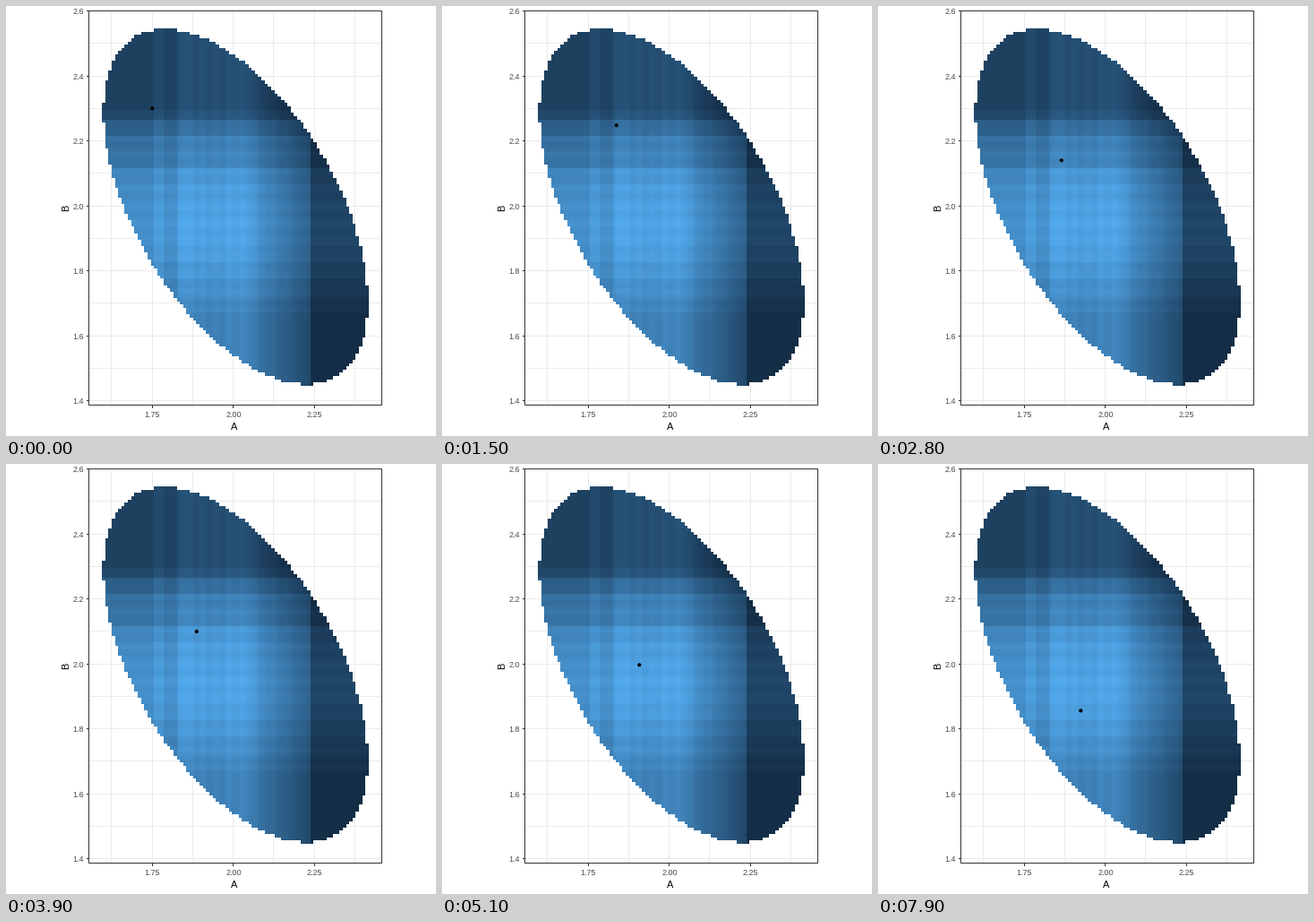
A matplotlib script that plays this animation: 480 px wide and 480 px high, repeating every 10000 ms.

```python
import numpy as np
import matplotlib.pyplot as plt
from matplotlib.animation import FuncAnimation
from matplotlib.patches import Circle, Rectangle

SIZE, DPI = 480, 100
PX = 72 / DPI                      # one pixel in points
SCALE = 362.6                      # pixels per data unit
FRAMES, INTERVAL = 100, 100
LEFT, RIGHT, TOP, BOTTOM = 92.5, 419.5, 5.5, 445.5
GRID, DARK, GREY = "#EBEBEB", "#333333", "#4D4D4D"


def to_x(a):
    return 163 + (a - 1.75) * SCALE


def to_y(b):
    return 223.2 - (b - 2) * SCALE


def profile(cells, keys):
    """Level per cell, linear between (cell, level) keys."""
    return np.interp(cells, *zip(*keys))


def heatmap():
    rng = np.random.RandomState(4)
    ca, cb = np.arange(160, 242), np.arange(254, 144, -1)   # hundredths

    f = profile(ca, [(175, .80), (176, .90), (178, .90), (179, .82), (182, .82),
                     (183, .95), (203, .95), (223, .46), (224, .23)])
    noise = np.repeat(rng.uniform(-.03, .03, ca.size // 2), 2)
    f *= 1 + noise * ((ca >= 183) & (ca < 224))

    g = profile(cb, [(165, .70), (185, .92), (195, .96), (203, .92), (211, .84),
                     (212, .74), (221, .69), (222, .57), (226, .54),
                     (227, .37), (229, .36), (230, .31)])
    noise = rng.uniform(-.02, .02, cb.size) - .04 * np.cos(2 * np.pi * (cb - 186.5) / 5.3)
    g *= 1 + noise * ((cb > 165) & (cb < 222))

    f, g = f[None, :], g[:, None]
    t = np.clip(f * g - .6 * (1 - f) * (1 - g), 0, 1)[..., None]
    low, high = np.array([19, 43, 67]) / 255, np.array([86, 177, 247]) / 255

    u = (ca[None, :] / 100 - 2.006) / .4067
    v = (cb[:, None] / 100 - 1.996) / .547
    rho = -.533
    inside = u * u - 2 * rho * u * v + v * v <= 1 - rho * rho
    return np.dstack([low + (high - low) * t, inside.astype(float)])


fig = plt.figure(figsize=(SIZE / DPI, SIZE / DPI), dpi=DPI, facecolor="white")
ax = fig.add_axes([0, 0, 1, 1])
ax.axis("off")


def vline(x, y0, y1, color):
    ax.add_patch(Rectangle((np.floor(x), y0), 1, y1 - y0, fc=color, lw=0, zorder=1))


def hline(y, x0, x1, color):
    ax.add_patch(Rectangle((x0, np.floor(y)), x1 - x0, 1, fc=color, lw=0, zorder=1))


def label(x, y, s, size, color, **kw):
    ax.text(x, y, s, fontsize=size * PX, color=color, family="Liberation Sans", **kw)


for a in np.arange(1.625, 2.4, .125):
    vline(to_x(a), TOP, BOTTOM, GRID)
for b in np.arange(1.4, 2.61, .1):
    hline(to_y(b), LEFT, RIGHT, GRID)

for a in (1.75, 2.0, 2.25):
    vline(to_x(a), BOTTOM, BOTTOM + 3, DARK)
    label(to_x(a) + .3, 458.6, f"{a:.2f}", 9, GREY, ha="center", va="baseline")
for b in np.arange(1.4, 2.61, .2):
    hline(to_y(b), LEFT - 3, LEFT, DARK)
    label(87.3, to_y(b) + 3.7, f"{b:.1f}", 9, GREY, ha="right", va="baseline")
label(255, 473, "A", 11, "black", ha="center", va="baseline")
label(67.3, 225.5, "B", 11, "black", ha="center", va="center", rotation=90)

ax.imshow(heatmap(), extent=(to_x(1.595), to_x(2.415), to_y(1.445), to_y(2.545)),
          origin="upper", interpolation="nearest", aspect="auto", zorder=2)
ax.add_patch(Rectangle((LEFT, TOP), RIGHT - LEFT, BOTTOM - TOP, fill=False,
                       ec=DARK, lw=PX, snap=False, zorder=3))
dot = ax.add_patch(Circle((0, 0), 2.1, fc="black", lw=0, zorder=4))
ax.set_xlim(0, SIZE)
ax.set_ylim(SIZE, 0)

# Stops of the dot: arrival step, leaving step, x, y
STOPS = [(0, 0, 163, 114), (7, 14, 193.5, 129), (24, 27, 202.6, 168),
         (31, 38, 210, 184), (44, 44, 225, 200), (51, 58, 220, 224),
         (65, 72, 226, 249), (79, FRAMES, 226, 275)]
arrive, leave, xs, ys = np.array(STOPS).T
times = np.column_stack([arrive, leave]).ravel()


def update(i):
    dot.center = [np.interp(i, times, np.repeat(p, 2)) + .3 for p in (xs, ys)]
    return dot,


anim = FuncAnimation(fig, update, frames=FRAMES, interval=INTERVAL, repeat=True)
plt.show()
```
